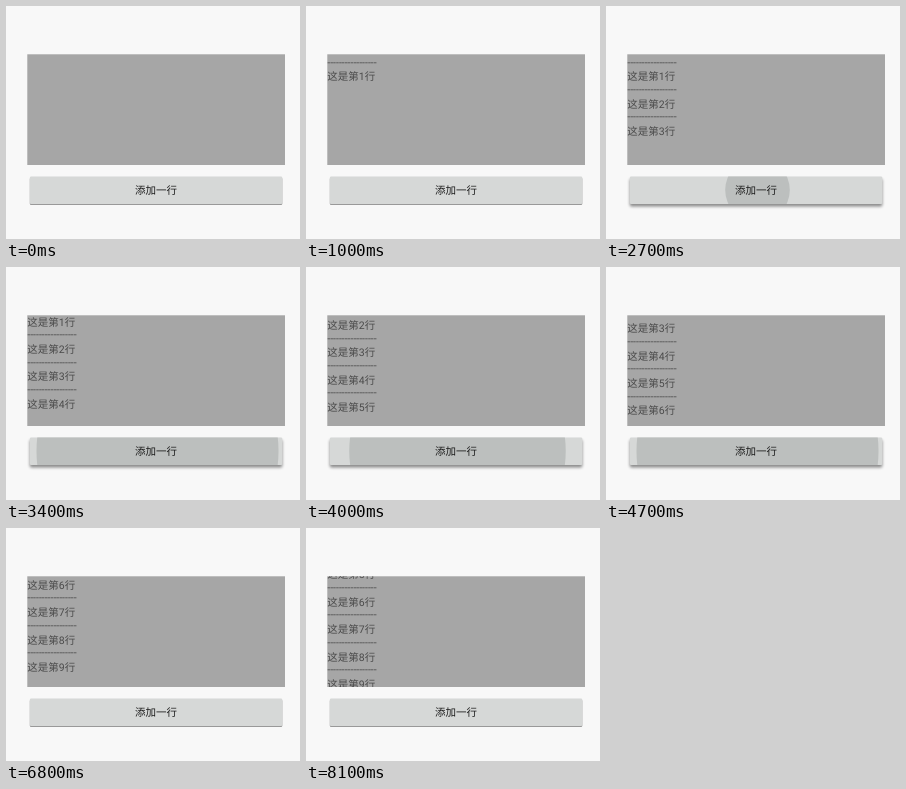
Animation of 294 by 233 pixels, one loop 9 s. Source, as an HTML page:

```html
<!DOCTYPE html>
<html lang="zh">
<head>
<meta charset="utf-8">
<style>
  html, body { margin: 0; width: 100%; height: 100%; overflow: hidden; background: #f8f8f8; }
  svg { display: block; width: 294px; height: 233px; }
  text {
    font: 10.5px Roboto, "Noto Sans CJK SC", "Noto Sans CJK", sans-serif;
    text-rendering: geometricPrecision;
  }
  #list { fill: #4a4a4a; }
  #label { fill: #1c1c1c; text-anchor: middle; }
</style>
</head>
<body>
<svg viewBox="0 0 294 233">
  <defs>
    <clipPath id="boxClip"><rect x="21.3" y="48.3" width="257.7" height="110.7"/></clipPath>
    <clipPath id="buttonClip"><rect x="23.8" y="170.6" width="252.5" height="27.4" rx="1.3"/></clipPath>
    <filter id="blur" filterUnits="userSpaceOnUse" x="10" y="160" width="280" height="60">
      <feGaussianBlur id="spread"/>
    </filter>
  </defs>
  <rect width="294" height="233" fill="#f8f8f8"/>
  <rect x="21.3" y="48.3" width="257.7" height="110.7" fill="#a6a6a6"/>
  <g clip-path="url(#boxClip)"><g id="list"></g></g>
  <rect id="shadow" x="23.8" width="252.5" height="27.4" rx="1.3" filter="url(#blur)"/>
  <rect x="23.8" y="170.6" width="252.5" height="27.4" rx="1.3" fill="#d6d8d7"/>
  <g clip-path="url(#buttonClip)"><circle id="ripple" cx="151.5" cy="184" fill="#bcbfbe"/></g>
  <text id="label" x="150" y="188">添加一行</text>
</svg>
<script>
const LOOP = 9000, STEP = 100;
const PITCH = 27.4, LINE = 24.1;
const HOLD = 130, FADE = 220, FULL = 135;
const BOTTOM = 150.5, DRAG_START = 6800;
const taps = [580, 1223, 1923, 2680, 3308, 3923, 4608, 5223, 5733];

const $ = id => document.getElementById(id);
const list = $('list'), ripple = $('ripple'), shadow = $('shadow');

function add(parent, tag, attrs, content = '') {
  const el = document.createElementNS('http://www.w3.org/2000/svg', tag);
  set(el, attrs);
  el.textContent = content;
  return parent.appendChild(el);
}

function set(el, attrs) {
  for (const key in attrs) el.setAttribute(key, attrs[key]);
}

// Smooth 0..1 progress between two times
function glide(t, from, to) {
  const p = Math.min(1, Math.max(0, (t - from) / (to - from)));
  return p * p * (3 - 2 * p);
}

const rows = taps.map((_, i) => {
  const g = add(list, 'g', {});
  const y = 59.5 + i * PITCH;
  add(g, 'text', { x: 21.3, y }, '-'.repeat(17));
  add(g, 'text', { x: 21.3, y: y + 14.8 }, `这是第${i + 1}行`);
  return g;
});

function scrollAt(t, count) {
  if (t >= DRAG_START) return BOTTOM - 54 * glide(t, 6900, 7300) + 37 * glide(t, 7700, 8100);
  // Appending scrolls by the nominal line height, less than the real row pitch
  return Math.max(0, LINE * count - 80.8);
}

function draw(time) {
  const t = Math.floor(time / STEP) * STEP;
  const count = taps.filter(start => t - start >= HOLD).length;
  const age = t - taps.filter(start => start <= t).pop();
  const held = age < HOLD;
  const fade = Math.max(0, 1 - (age - HOLD) / FADE) || 0;
  const lift = held ? 1 : fade;

  rows.forEach((row, i) => set(row, { visibility: i < count ? 'visible' : 'hidden' }));
  set(list, { transform: `translate(0 ${-scrollAt(t, count)})` });
  set(ripple, {
    r: held ? FULL * Math.sin(Math.PI / 2 * age / HOLD) : FULL,
    opacity: held ? 1 : 0.55 * fade
  });
  set(shadow, { y: 171.6 + 1.4 * lift, opacity: 0.38 + 0.06 * lift });
  set($('spread'), { stdDeviation: 0.7 + 1.1 * lift });
}

const begin = performance.now();
function tick() {
  draw((performance.now() - begin) % LOOP);
  requestAnimationFrame(tick);
}
tick();
</script>
</body>
</html>
```
